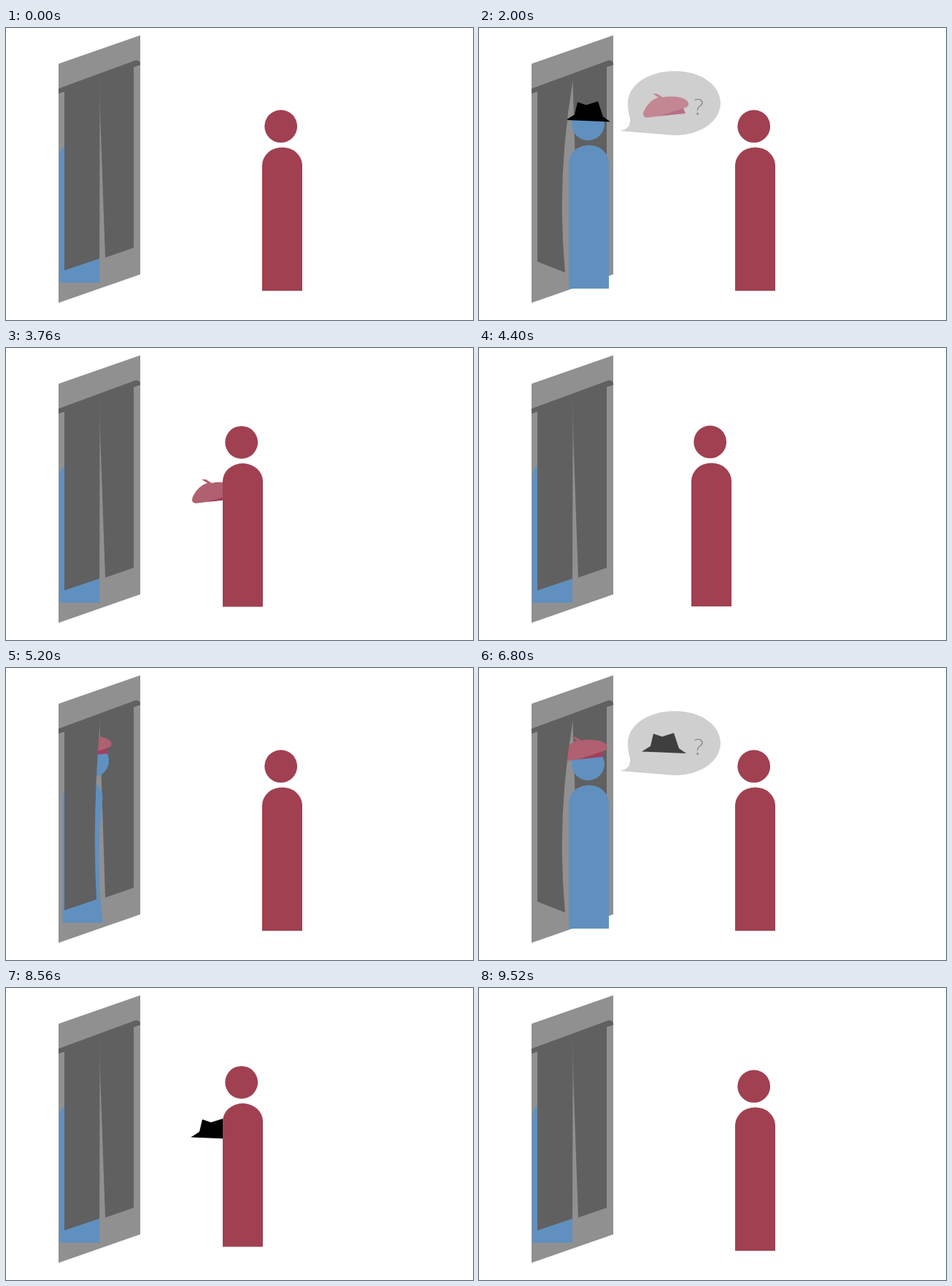
Write an HTML page that moves like this. It is 640 px wide and 400 px high and loops after 9.6 s.

```html
<!DOCTYPE html>
<html lang="en">
<head>
<meta charset="utf-8">
<title>Hat exchange</title>
<style>
  html, body { margin: 0; width: 100%; height: 100%; overflow: hidden; background: #fff; }
  svg { display: block; width: 640px; height: 400px; }
  .wall { fill: #909090; }
  .cloth { fill: #606060; }
  .guest { fill: #6090c0; }
  .keeper { fill: #a04050; }
</style>
</head>
<body>
<svg viewBox="0 0 640 400">
  <defs>
    <g id="beret">
      <path fill="#b06070" d="M238 90H244L252 95C265 92 286 95 287 103C288 107 284 109 280 110L270 118L230 122.7C224 122 224 117 227 112C231 104 238 97 246 95Z"/>
      <path fill="#a04060" d="M247 120.7L280 110L283 117Z"/>
    </g>
    <path id="fedora" d="M223 114.5L235 107L239 90L251 94L267 89L274 110L284 117Z"/>
    <clipPath id="slit"><path d="M128.5 0H640V400H128.5Z"/></clipPath>
  </defs>

  <path class="wall" d="M72 49L184 10V337.5L72 376.5Z"/>
  <path class="cloth" d="M72 83L177 44.5Q182 43 184 48V50.5L72 90Z"/>
  <path class="cloth" id="rightCloth"/>
  <g class="guest">
    <path id="guestBody"/>
    <g id="guestHead"><circle id="guestFace" r="22.5"/><use id="wornHat" fill="#000"/></g>
  </g>
  <path class="cloth" id="leftCloth"/>

  <g id="bubble">
    <path fill="#c0c0c0" d="M193 141C203 139 208 135 207 124C204.500 117 204 109 204 103C204 78 232 59 268 59C304 59 331 78 331 103C331 128 303 147 268 147Z"/>
    <use id="wantedHat"/>
    <text class="cloth" x="301" y="119" text-anchor="middle" font-family="'Open Sans', sans-serif" font-weight="300" font-size="32">?</text>
  </g>

  <g clip-path="url(#slit)"><use id="heldHat"/></g>
  <g class="keeper" id="keeper">
    <path id="keeperBody"/>
    <circle cx="25.700" cy="-225.300" r="22.400"/>
  </g>
</svg>
<script>
const LOOP = 9600, HALF = 4800, STEP = 80;
const el = id => document.getElementById(id);
const set = (id, attrs) => {
  for (const name in attrs) el(id).setAttribute(name, attrs[name]);
};
const mix = (a, b, u) => a + (b - a) * u;

// Linear keyframes: [time, value], ...
function track(t, ...keys) {
  const i = keys.findIndex(k => k[0] >= t);
  if (i === 0) return keys[0][1];
  if (i < 0) return keys[keys.length - 1][1];
  const [t0, a] = keys[i - 1], [t1, b] = keys[i];
  return mix(a, b, (t - t0) / (t1 - t0));
}

// Round-shouldered body standing on y, with an optional dent in its right side.
const body = (x, y, dent = 0) =>
  `M${x} ${y}V${y - 172}A27.5 24.5 0 0 1 ${x + 55} ${y - 172}Q${x + 55 - dent} ${y - 86} ${x + 55} ${y}Z`;

const hatOnHead = { fedora: [-253.5, -120], beret: [-261, -127] };

function drawDoor(out, hat) {
  // Values for the hidden, peeking and outside poses
  const pose = (...v) => track(out, [0, v[0]], [1, v[1]], [2, v[2]]);
  const apex = pose(102, 80, 73);
  const headX = pose(100, 118.5, 149.5), headY = pose(123, 127, 131.5);
  const [hatX, hatY] = hatOnHead[hat];

  set('rightCloth', { d: `M128 67L175 53V301L136 314.5L128.5 ${apex}Z` });
  set('leftCloth', {
    d: `M80 84L128.500 66V${apex}Q${pose(128.5, 118, 106)} 205 ${pose(128, 124, 118)} ${pose(316, 317, 335)}L80 ${pose(332, 332, 320)}Z`
  });
  set('guestBody', { d: body(pose(73, 77.5, 123), pose(349, 349, 357), pose(0, 10, 0)) });
  set('guestHead', { visibility: out > 0 ? 'visible' : 'hidden' });
  set('guestFace', { cx: headX, cy: headY });
  set('wornHat', { href: '#' + hat, transform: `translate(${headX + hatX} ${headY + hatY})` });
}

function drawKeeper(t, hat) {
  const x = track(t, [2240, 0], [2960, 310], [3040, 310], [3760, -54],
    [4000, -66], [4160, -75], [4320, -75], [4720, 0]);
  const y = Math.min(0, x) * 0.1;
  const hatX = t <= 3760 ? x + 84 : track(t, [3760, 30], [4000, -58], [4320, -162]);
  const hatY = t <= 3760 ? y + 95.4 : 87 + hatX * 0.1;

  set('keeper', { transform: `translate(${351 + x} ${360 + y})` });
  set('heldHat', {
    href: '#' + hat,
    transform: `translate(${hatX} ${hatY})`,
    visibility: t >= 3040 && t < 4320 ? 'visible' : 'hidden'
  });
}

function draw(now) {
  const time = Math.floor(now % LOOP / STEP) * STEP;
  const t = time % HALF, second = time >= HALF;
  const worn = second ? 'beret' : 'fedora';
  const wanted = second ? 'fedora' : 'beret';
  const ask = second ? 640 : 720;

  drawDoor(track(t, [320, 0], [400, 1], [640, 2], [2240, 2], [2480, 1], [2560, 0]), worn);
  drawKeeper(t, wanted);
  set('wantedHat', { href: '#' + wanted });
  set('bubble', { opacity: track(t, [ask, 0], [ask + 320, 1], [1920, 1], [2240, 0]) });
}

set('keeperBody', { d: body(0, 0) });
const start = performance.now();
(function tick() {
  draw(performance.now() - start);
  requestAnimationFrame(tick);
})();
</script>
</body>
</html>
```
